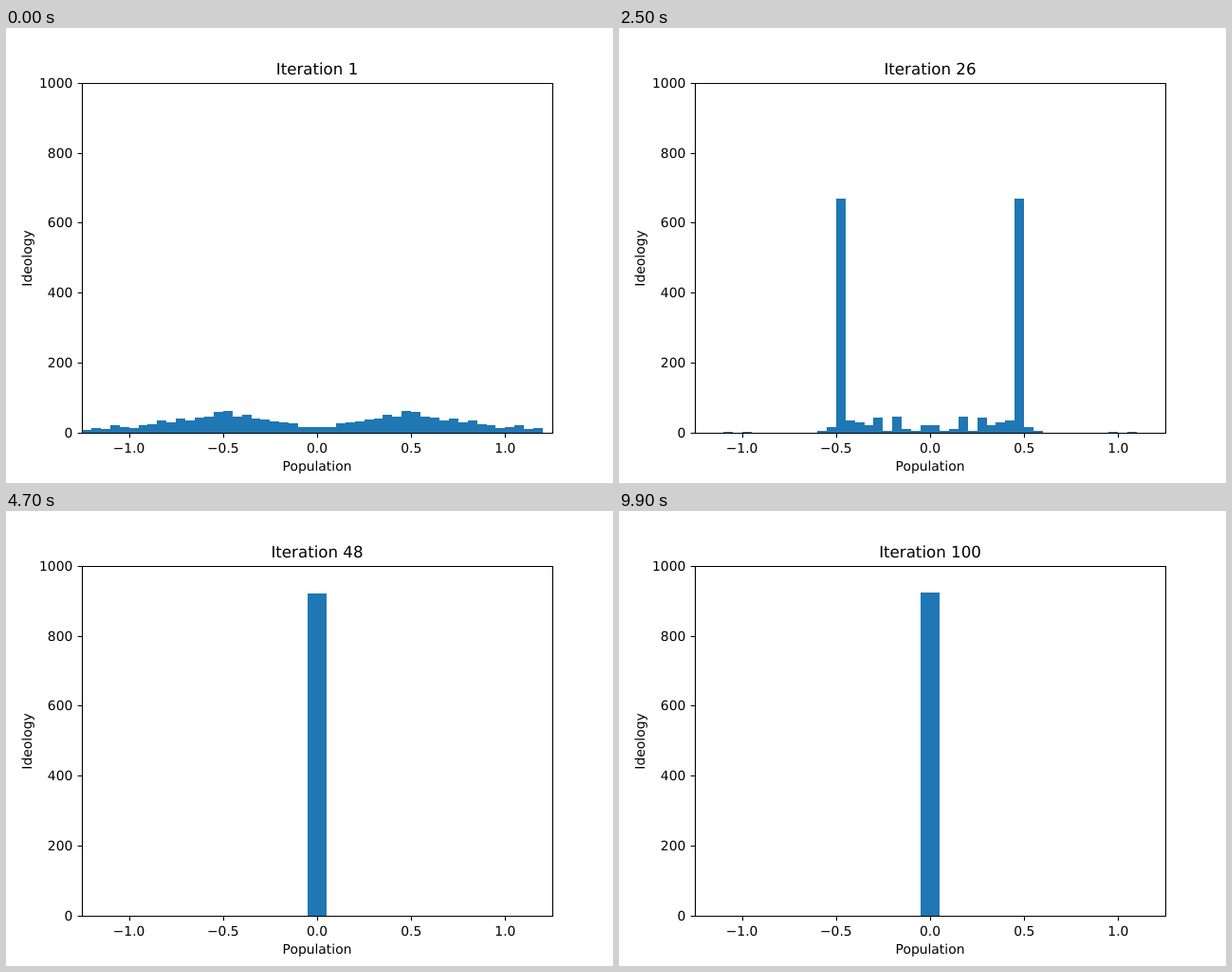
Recreate the animation shown at these times as an HTML page. Size 640 px wide and 480 px high, loop 10000 ms.

```html
<!DOCTYPE html>
<html lang="en">
<head>
<meta charset="utf-8">
<title>Histogram by iteration</title>
<style>
  html, body { margin: 0; width: 100%; height: 100%; overflow: hidden; background: #fff; }
  svg { display: block; }
  text {
    font: 13.89px "DejaVu Sans", Verdana, sans-serif;
    text-anchor: middle;
    text-rendering: geometricPrecision;
  }
  #title { font-size: 16.67px; }
  .right { text-anchor: end; }
  #bars { fill: #1f77b4; shape-rendering: crispEdges; }
  #axes { fill: none; stroke: #000; stroke-width: 1.11; }
</style>
</head>
<body>
<svg id="plot" width="640" height="480" viewBox="0 0 640 480">
  <path id="bars"/>
  <path id="axes"/>
  <text id="title" x="328" y="49"></text>
  <text x="328" y="467">Population</text>
  <text transform="translate(27 243) rotate(-90)">Ideology</text>
</svg>
<script>
const STEP = 100, STEPS = 100;
const PEOPLE = 921, LATE_STEP = 94, LATE_EXTRA = 2;
const BIN = 9.92, HALF_BINS = 25;
const LEFT = 80, RIGHT = 576, MID = 328, BASE = 427.2, UNIT = 0.3696;

const $ = id => document.getElementById(id);
const px = v => Math.floor(v + 0.5);

// Counts per bin from the centre outwards; both sides mirror each other.
const keys = [
  { step: 0, counts: [17, 17, 27, 30, 33, 38, 41, 52, 46, 62, 60, 46, 43,
                      36, 40, 30, 36, 24, 22, 13, 16, 22, 11, 14, 8] },
  { step: 16, counts: [4, 9, 6, 14, 4, 4, 22, 5, 9, 16, 46, 735, 11,
                       6, 4, 6, 4, 3, 0, 0, 3, 3, 0, 0, 3] },
  { step: 25, counts: [22, 6, 11, 46, 6, 44, 22, 30, 36, 670, 16, 6, 0,
                       0, 0, 0, 0, 0, 0, 3, 0, 3] },
  { step: 39, counts: [380, 333, 156, 52] },
  { step: 49, counts: [PEOPLE] }
];

// Sorted positions, in bins from the centre; anyone left over is out of view.
function spread(counts) {
  const list = [];
  counts.forEach((n, bin) => {
    const width = n > 600 ? 0.4 : 1;
    for (let k = 0; k < n; k++) list.push(bin + 0.5 + ((k + 0.5) / n - 0.5) * width);
  });
  const rest = PEOPLE - list.length;
  for (let k = 0; k < rest; k++) list.push(HALF_BINS + 10 * (k + 0.5) / rest);
  return list;
}
keys.forEach(key => key.people = spread(key.counts));

function countsAt(step) {
  const last = keys.length - 1;
  if (step >= keys[last].step) return [PEOPLE + (step >= LATE_STEP ? LATE_EXTRA : 0)];
  const i = keys.findIndex(key => key.step > step) - 1;
  const a = keys[i], b = keys[i + 1];
  const span = b.step - a.step, t = step - a.step;
  const settle = (1 - 0.87 ** t) / (1 - 0.87 ** span);
  const counts = Array(HALF_BINS).fill(0);
  a.people.forEach((from, k) => {
    const to = b.people[k];
    const pos = i === 0 ? from + (to - from) * settle : from * (to / from) ** (t / span);
    const bin = Math.floor(pos + 1e-9);
    if (bin < HALF_BINS) counts[bin]++;
  });
  return counts;
}

function bar(bin, count) {
  const top = px(BASE - count * UNIT);
  return `M${px(MID + bin * BIN)} ${px(BASE)}V${top}H${px(MID + (bin + 1) * BIN)}V${px(BASE)}Z`;
}

function draw(step) {
  let path = "";
  countsAt(step).forEach((n, bin) => {
    if (!n) return;
    path += bar(-bin - 1, n);
    if (bin < HALF_BINS - 1) path += bar(bin, n);
  });
  $("bars").setAttribute("d", path);
  $("title").textContent = "Iteration " + (step + 1);
}

function label(x, y, text, cls) {
  const el = document.createElementNS("http://www.w3.org/2000/svg", "text");
  el.setAttribute("x", x);
  el.setAttribute("y", y);
  if (cls) el.setAttribute("class", cls);
  el.textContent = text;
  $("plot").append(el);
}

function drawAxes() {
  let path = `M${LEFT + 0.5} 58.5H${RIGHT + 0.5}V427.5H${LEFT + 0.5}Z`;
  for (let v = -1; v <= 1; v += 0.5) {
    const x = MID + v * 20 * BIN;
    path += `M${px(x) + 0.5} 427.5v4.86`;
    label(x, 448, v.toFixed(1).replace("-", "\u2212"));
  }
  for (let v = 0; v <= 1000; v += 200) {
    const y = px(BASE - v * UNIT);
    path += `M${LEFT + 0.5} ${y + 0.5}h-4.86`;
    label(70.3, y + 5, v, "right");
  }
  $("axes").setAttribute("d", path);
}

let shown = -1;
function tick() {
  const step = Math.floor(performance.now() / STEP) % STEPS;
  if (step !== shown) draw(shown = step);
  requestAnimationFrame(tick);
}

drawAxes();
tick();
</script>
</body>
</html>
```
